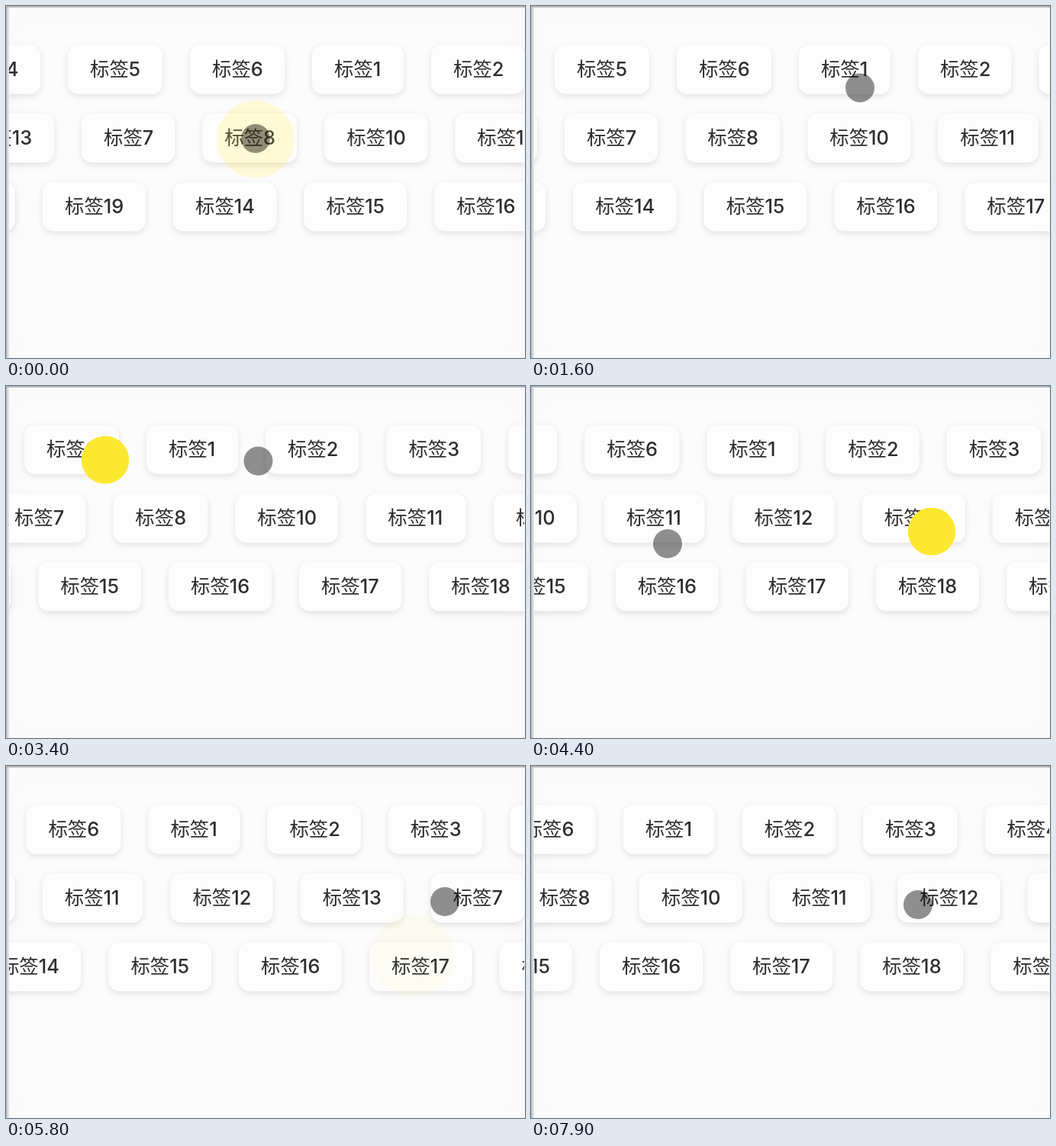
Recreate the animation shown at these times as an HTML page. Size 680 by 462 pixels, loop 8000 ms.

```html
<!DOCTYPE html>
<html lang="zh">
<head>
<meta charset="utf-8">
<style>
  html, body { margin: 0; width: 100%; height: 100%; overflow: hidden; background: #fcfcfc; }
  svg { display: block; width: 680px; height: 462px; }
  .card { fill: #fdfdfd; filter: drop-shadow(0 3px 4px rgba(0, 0, 0, .11)); }
  text { font: 500 25.4px Inter, "Noto Sans CJK SC", "Noto Sans CJK", sans-serif; fill: #2d2d2d; }
</style>
</head>
<body>
<svg id="stage" viewBox="0 0 680 462">
  <defs>
    <clipPath id="view"><rect x="4" y="2" width="675" height="460"/></clipPath>
    <filter id="soft" x="-10%" y="-10%" width="120%" height="120%"><feGaussianBlur stdDeviation="9"/></filter>
  </defs>
  <rect width="680" height="462" fill="#fafafa"/>
  <rect x="18" y="24" width="646" height="424" fill="#fcfcfc" filter="url(#soft)"/>
  <g id="rows" clip-path="url(#view)"></g>
  <rect width="4" height="462" fill="#dce1e7"/>
  <rect width="1.5" height="462" fill="#b4bac1"/>
  <rect width="680" height="2" fill="#b9b9b9"/>
  <circle id="press" fill="#fde831"/>
  <circle id="touch" r="19" fill="#000" fill-opacity=".44"/>
</svg>
<script>
const LOOP = 8000, STEP = 100, FADE = 430, GAP = 36, PAD = 29, RADIUS = 31.3;
const $ = id => document.getElementById(id);

function add(parent, tag, attrs) {
  const el = document.createElementNS('http://www.w3.org/2000/svg', tag);
  set(el, attrs);
  return parent.appendChild(el);
}
function set(el, attrs) {
  for (const key in attrs) el.setAttribute(key, attrs[key]);
}

// x: place of the first tag at time 0, speed in px per second
const rows = [
  { y: 51, x: 401, speed: 31.3, tags: [1, 2, 3, 4, 5, 6], widths: [120, 122.4, 123.5, 125, 124, 124] },
  { y: 141, x: 99, speed: 34.4, tags: [7, 8, 10, 11, 12, 13], widths: [122.3, 124, 135, 131.6, 134.3, 135] },
  { y: 231, x: 219, speed: 102.4, tags: [14, 15, 16, 17, 18, 19], widths: [135.5, 134.7, 135, 134.3, 135, 135] }
];

// press and release bracket the movement from start to end; shift is how far the row goes
const drags = [
  { row: 0, press: 2000, end: 2630, release: 2760, from: [435, 89], to: [91, 99], shift: -311 },
  { row: 0, press: 3100, end: 3560, release: 3620, from: [130, 97], to: [408, 99], shift: 278 },
  { row: 1, press: 3950, end: 4380, release: 4450, from: [525, 191], to: [179, 207], shift: -341 },
  { row: 2, press: 4850, end: 5330, release: 5390, from: [195, 250], to: [533, 249], shift: 337.8 },
  { row: 1, press: 5850, end: 6330, release: 6390, from: [575, 178], to: [254, 180], shift: -321 },
  { row: 1, press: 7000, end: 7440, release: 7450, from: [631, 179], to: [291, 195], shift: -340 }
];

const path = [
  [0, 327, 174], [800, 417, 172],
  ...drags.flatMap(d => [
    [d.press - 50, ...d.from], [d.press, ...d.from],
    [d.end, ...d.to], [d.release, ...d.to]
  ]),
  [7900, 507, 182], [LOOP, 520, 182]
];

const pulses = [{ release: -348, to: [327, 175] }, ...drags];

for (const row of rows) {
  row.group = add($('rows'), 'g', {});
  row.length = row.widths.reduce((sum, w) => sum + w + GAP, 0);
  let x = -row.length;
  for (let copy = 0; copy < 2; copy++) {
    row.tags.forEach((tag, i) => {
      const width = row.widths[i];
      add(row.group, 'rect', { class: 'card', x, y: row.y, width, height: 64.5, rx: 14 });
      add(row.group, 'text', { x: x + PAD, y: row.y + 41.3 }).textContent = '标签' + tag;
      x += width + GAP;
    });
  }
}

function ease(t, from, to) {
  const p = Math.min(1, Math.max(0, (t - from) / (to - from)));
  return p * p * (3 - 2 * p);
}

function touchAt(t) {
  const i = path.findIndex(p => p[0] > t);
  const a = path[i - 1], b = path[i], k = ease(t, a[0], b[0]);
  return [a[1] + (b[1] - a[1]) * k, a[2] + (b[2] - a[2]) * k];
}

function highlightAt(t) {
  const held = drags.find(d => t >= d.press && t < d.release);
  if (held) return { cx: held.from[0], cy: held.from[1], r: RADIUS, opacity: 1 };
  const pulse = pulses.find(p => t >= p.release && t < p.release + FADE);
  if (!pulse) return { opacity: 0 };
  const k = (t - pulse.release) / FADE;
  return { cx: pulse.to[0], cy: pulse.to[1], r: RADIUS + 24 * k, opacity: 1 - k };
}

function draw(t) {
  rows.forEach((row, i) => {
    let x = row.x - row.speed * t / 1000;
    for (const d of drags) if (d.row === i) x += d.shift * ease(t, d.press, d.end);
    x = ((x % row.length) + row.length) % row.length;
    set(row.group, { transform: `translate(${x.toFixed(2)} 0)` });
  });
  const [cx, cy] = touchAt(t);
  set($('touch'), { cx, cy });
  set($('press'), highlightAt(t));
}

const begin = performance.now();
function tick() {
  const t = (performance.now() - begin) % LOOP;
  draw(Math.floor(t / STEP) * STEP);
  requestAnimationFrame(tick);
}
tick();
</script>
</body>
</html>
```
